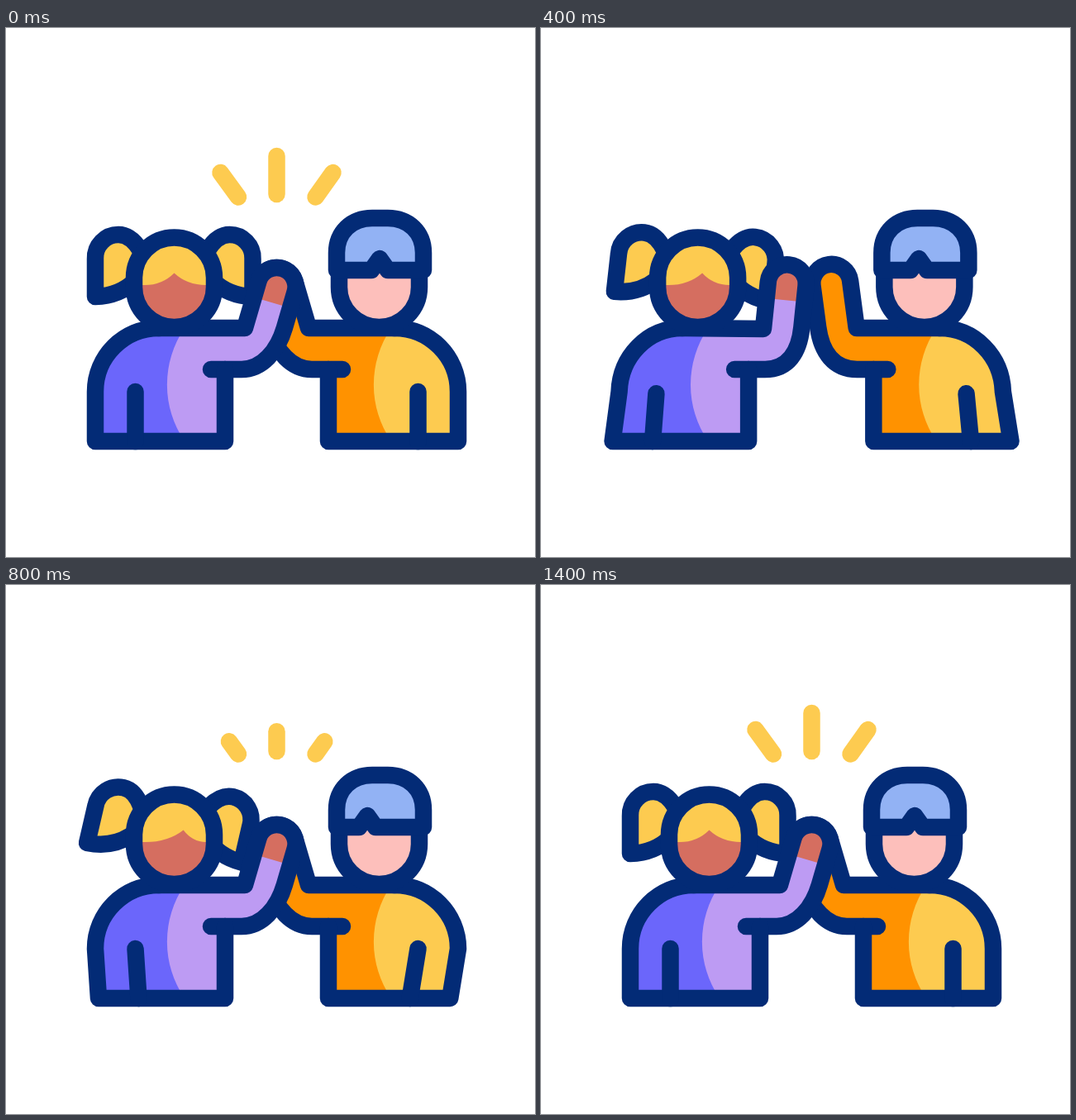
An HTML page with a canvas for the animation above (1.6 s loop, 640 by 640 pixels).

```html
<!DOCTYPE html>
<html lang="en">
<head>
<meta charset="utf-8">
<title>High five</title>
<style>
  html, body { margin: 0; width: 100%; height: 100%; overflow: hidden; background: #fff; }
  canvas { display: block; width: 640px; height: 640px; }
</style>
</head>
<body>
<canvas id="stage"></canvas>
<script>
const LOOP = 1600, STEP = 20, AXIS = 655;
const NAVY = '#032b76', YELLOW = '#fdcb50', SKIN = '#d56e60', PINK = '#fdbfbb', SKY = '#92b2f4';

const canvas = document.getElementById('stage');
const ctx = canvas.getContext('2d');
const ratio = window.devicePixelRatio || 1;
canvas.width = canvas.height = 640 * ratio;

// Cubic-bezier easing, solved by bisection
function bezier(x1, y1, x2, y2) {
  const at = (a, b, s) => 3 * (1 - s) * (1 - s) * s * a + 3 * (1 - s) * s * s * b + s * s * s;
  return p => {
    let lo = 0, hi = 1;
    for (let i = 0; i < 24; i++) {
      const mid = (lo + hi) / 2;
      if (at(x1, x2, mid) < p) lo = mid; else hi = mid;
    }
    return at(y1, y2, lo);
  };
}
const leave = bezier(.5, 0, .75, .75);
const clap = bezier(.4, 0, .6, 1);
const settle = bezier(.4, 0, .4, 1);

function ramp(t, from, to, ease) {
  if (t <= from) return 0;
  if (t >= to) return 1;
  return ease((t - from) / (to - from));
}

function pose(t) {
  const out = ramp(t, 60, 600, leave);
  const apart = out - ramp(t, 600, 760, clap);
  const lag = out - ramp(t, 680, 1400, settle);
  const kick = t > 600 ? (1 - apart) * lag : 0;
  return { apart, lag, kick };
}

const girl = {
  shift: 30.3, swing: 16.5, kick: 4.3, elbow: 7,
  reach: 34.8, lift: 8, turn: 22.8, sag: 2,
  back: '#6b66fb', front: '#bd9bf3', seam: [216, 0], hand: SKIN
};
const boy = {
  shift: 27, swing: 20, kick: 10.5, elbow: 8,
  reach: 25, lift: 9, turn: 19, sag: 0,
  back: YELLOW, front: '#ff9200', seam: [189, 1]
};

const fill = (d, color) => { ctx.fillStyle = color; ctx.fill(new Path2D(d)); };
const line = (d, color = NAVY) => { ctx.strokeStyle = color; ctx.stroke(new Path2D(d)); };

const HEAD = 'M155 302 A48.5 48.5 0 0 1 252 302 V313.5 A48.5 48.5 0 0 1 155 313.5 Z';

function body(who, { apart, kick }) {
  const foot = who.kick * kick - who.swing * apart;
  const side = 108 + apart;
  const [seamX, sweep] = who.seam;
  const seam = `A121.6 121.6 0 0 ${sweep} ${seamX} 500`;

  // Raised arm: points are placed across and down from the hand along its axis
  const hx = 327.5 - who.reach * apart, hy = 313 - who.lift * apart;
  const angle = (16.3 - who.turn * apart) * Math.PI / 180;
  const sin = Math.sin(angle), cos = Math.cos(angle);
  const spot = (across, down) =>
    [hx + across * cos - down * sin, hy + across * sin + down * cos];
  const bendY = 363 + who.sag * apart;
  const [lx, ly] = spot(-23, 0);
  const bendX = lx - (bendY - ly) * sin / cos;
  const fist = `${spot(23, 0)} A23 23 0 0 0 ${lx} ${ly}`;
  const elbow = `C${310 + 6 * apart} 413 ${spot(23, 74 + 16 * apart)} ${spot(23, 45 + 12 * apart)}`;
  const arm = `H285 ${elbow} L${fist} L${bendX} ${bendY}`;
  const back = `H${108 + foot} L${side} 440 C${side + 3 * apart} 397.5 142.5 363 185 363`;

  fill(`M240 500 ${back} H240 Z`, who.back);
  fill(`M${seamX} 363 ${seam} H265 V413 ${arm} Z`, who.front);
  if (who.hand) fill(`M${spot(23, 20)} L${fist} L${spot(-23, 20)} Z`, who.hand);

  line(`M248 413 ${arm} L185 363`);
  line(`M265 413 V500 ${back}`);
  line(`M${156.5 - who.elbow * apart} ${440 + 5 * apart} L${156.5 + foot} 500`);
}

function pigtail(x, y, lag, flip) {
  const d = 'M162 268 C155 257 147 250 136 250 A28 28 0 0 0 108 279 V325 C126 324.5 144 318 157 305';
  ctx.save();
  ctx.translate(x, y);
  ctx.rotate(14 * lag * Math.PI / 180);
  ctx.translate(-x, -y);
  if (flip) { ctx.translate(406.5, 0); ctx.scale(-1, 1); }
  fill(d + ' Z', YELLOW);
  line(d);
  ctx.restore();
}

function girlHead(lag) {
  const g = 12 * lag;
  fill(HEAD, SKIN);
  fill(`M155 311 H165 Q${188 + g * .6} 312 ${203.5 + g} 296.5 Q${219 + g * .6} 311 242 311 H252
    V302 A48.5 48.5 0 0 0 155 302 Z`, YELLOW);
  line(HEAD);
}

function boyHead(lag) {
  const x = 203 + 16 * lag;
  const cap = 'V272 C150 247 168 230 193 230 H212 C237 230 255 247 255 272 V293';
  const rim = `H${x + 10} L${x} 279 L${x - 10} 293 H150`;
  fill(HEAD, PINK);
  line(HEAD);
  fill(`M150 293 ${cap} ${rim} Z`, SKY);
  line(`M150 293 ${cap} ${rim} Z`);
}

// Base, tip and drift of each ray
const rays = [
  [281, 204.5, 259.5, 175, -5.7, -12],
  [327.5, 201, 327.5, 155, 0, -14.5],
  [374.5, 204.5, 395.5, 175, 8.7, -12]
];

function sparks(t) {
  const early = t < 600;
  const drift = early ? ramp(t, 60, 215, clap) : 0;
  const tail = early ? ramp(t, 195, 340, p => p) : 0;
  const tip = early ? 1 : ramp(t, 740, 858, clap);
  if (tip <= tail) return;
  for (const [bx, by, tx, ty, dx, dy] of rays) {
    const at = k => `${bx + (tx - bx) * k + dx * drift} ${by + (ty - by) * k + dy * drift}`;
    line(`M${at(tail)} L${at(tip)}`, YELLOW);
  }
}

function draw(t) {
  const p = pose(t);
  ctx.setTransform(ratio, 0, 0, ratio, 0, 0);
  ctx.fillStyle = '#fff';
  ctx.fillRect(0, 0, 640, 640);
  ctx.lineWidth = 20.5;
  ctx.lineCap = ctx.lineJoin = 'round';

  sparks(t);

  ctx.save();
  ctx.translate(AXIS, 0);
  ctx.scale(-1, 1);
  ctx.translate(-boy.shift * p.apart, 0);
  body(boy, p);
  boyHead(p.lag);
  ctx.restore();

  ctx.save();
  ctx.translate(-girl.shift * p.apart, 0);
  pigtail(160, 275, p.lag, false);
  pigtail(245, 272, p.lag, true);
  body(girl, p);
  girlHead(p.lag);
  ctx.restore();
}

const start = performance.now();
function tick() {
  const t = Math.max(0, performance.now() - start) % LOOP;
  draw(Math.floor(t / STEP) * STEP);
  requestAnimationFrame(tick);
}
tick();
</script>
</body>
</html>
```
